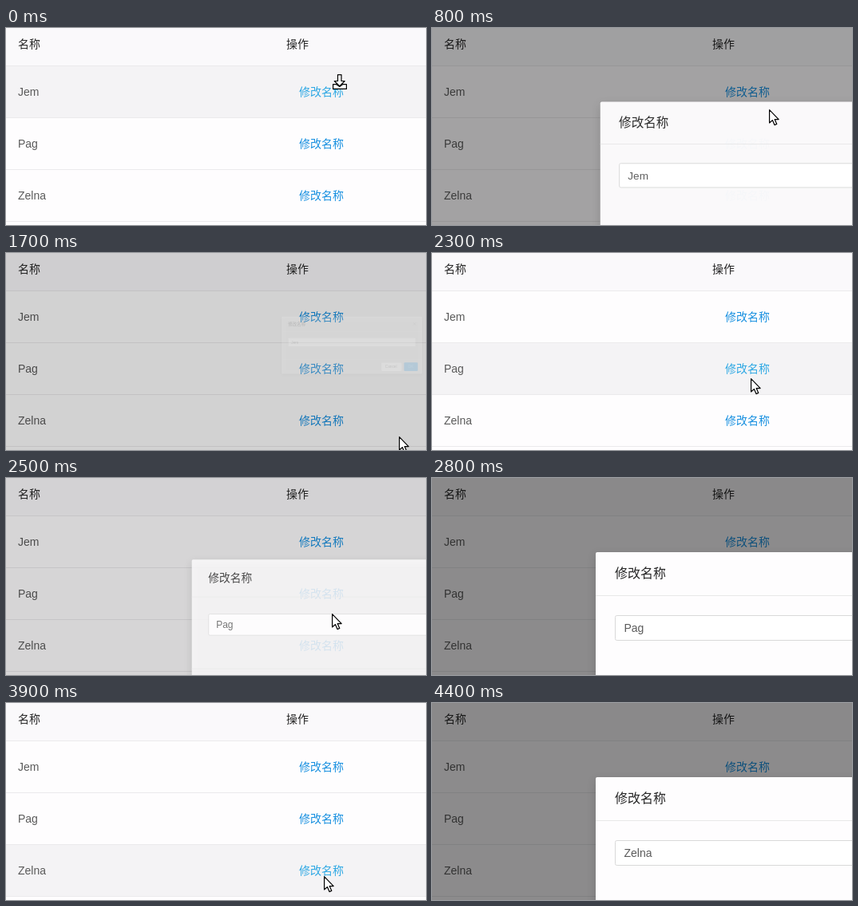
An HTML page with a canvas for the animation above (4800 ms loop, 526 by 247 pixels).

```html
<!DOCTYPE html>
<html lang="zh-CN">
<head>
<meta charset="utf-8">
<title>修改名称</title>
<style>
html, body { margin: 0; width: 100%; height: 100%; overflow: hidden; background: #fefdfe; }
canvas { display: block; width: 526px; height: 247px; }
</style>
</head>
<body>
<canvas id="stage"></canvas>
<script>
const W = 526, H = 247, LOOP = 4800, STEP = 100;
const FONT = '"Liberation Sans", "Noto Sans CJK SC", "Noto Sans CJK", sans-serif';
const BLUE = '#1890e0', HOVER_BLUE = '#2ea8e4';
const ROWS = ['Jem', 'Pag', 'Zelna'];
const ROW_TOP = 48, ROW_H = 65;

// x, y: zoom origin; lag: part of the closing already done at its first step
const DIALOGS = [
  { name: ROWS[0], x: 417, y: 73, open: 639, close: 1700, lag: 123 },
  { name: ROWS[1], x: 400, y: 159, open: 2430, close: 3300, lag: 10, cancelHover: true },
  { name: ROWS[2], x: 400, y: 217, open: 4030, close: Infinity, lag: 0 }
];

// time, x, y of the pointer tip; points outside the stage hide it
const POINTER = [
  [0, 416, 69], [400, 416, 69], [500, 417, 73], [600, 417, 73], [700, 418, 80],
  [800, 422, 102], [900, 452, 164], [1000, 498, 238], [1100, 560, 290], [1600, 670, 278],
  [1700, 492, 230], [1900, 432, 190], [2100, 405, 166], [2300, 399, 157], [2400, 400, 159],
  [2500, 408, 170], [2600, 436, 198], [2700, 482, 234], [2800, 560, 290], [3300, 560, 290],
  [3400, 308, 211], [3600, 352, 213], [3800, 396, 216], [4000, 400, 217], [4100, 406, 219],
  [4200, 432, 226], [4300, 478, 239], [4400, 560, 290], [4800, 560, 290]
];

const canvas = document.getElementById('stage');
const ctx = canvas.getContext('2d');
const ratio = window.devicePixelRatio || 1;
canvas.width = W * ratio;
canvas.height = H * ratio;

const clamp = v => Math.max(0, Math.min(1, v));

function bezier(x1, y1, x2, y2) {
  const at = (a, b, u) => 3 * a * u * (1 - u) ** 2 + 3 * b * u * u * (1 - u) + u ** 3;
  return x => {
    if (x <= 0 || x >= 1) return clamp(x);
    let lo = 0, hi = 1;
    for (let i = 0; i < 24; i++) {
      const mid = (lo + hi) / 2;
      if (at(x1, x2, mid) < x) lo = mid; else hi = mid;
    }
    return at(y1, y2, lo);
  };
}
const easeOut = bezier(0.08, 0.82, 0.17, 1);
const easeInOut = bezier(0.78, 0.14, 0.15, 0.86);

function pointerAt(t) {
  const i = POINTER.findIndex(p => p[0] > t);
  const [t0, x0, y0] = POINTER[i - 1], [t1, x1, y1] = POINTER[i];
  const k = (t - t0) / (t1 - t0);
  return { x: x0 + (x1 - x0) * k, y: y0 + (y1 - y0) * k };
}

// mask: backdrop strength, zoom: dialog progress
function dialogState(d, t) {
  if (t < d.open) return { mask: 0, zoom: 0 };
  if (t < d.close) {
    return { mask: clamp((t - d.open) / 200), zoom: easeOut((t - d.open) / 300) };
  }
  const k = clamp((t - d.close + d.lag) / 200);
  return { mask: 1 - k, zoom: 1 - easeInOut(k) };
}

function rect(x, y, w, h, color) {
  ctx.fillStyle = color;
  ctx.fillRect(x, y, w, h);
}

function text(s, x, y, color, size = 14) {
  ctx.font = `${size}px ${FONT}`;
  ctx.fillStyle = color;
  ctx.fillText(s, x, y);
}

function box(x, y, w, h, r, fill, stroke) {
  ctx.beginPath();
  ctx.roundRect(x, y, w, h, r);
  ctx.fillStyle = fill;
  ctx.fill();
  if (stroke) {
    ctx.strokeStyle = stroke;
    ctx.lineWidth = 1;
    ctx.stroke();
  }
}

function polygon(points) {
  ctx.beginPath();
  points.forEach(([x, y]) => ctx.lineTo(x, y));
  ctx.closePath();
  ctx.fillStyle = '#fff';
  ctx.fill();
  ctx.strokeStyle = '#000';
  ctx.lineWidth = 1.2;
  ctx.stroke();
}

function drawTable(p, active) {
  rect(0, 0, W, H, '#fefdfe');
  rect(0, 0, W, 47, '#faf9fb');
  rect(0, 47, W, 1, '#ebeaec');
  text('名称', 15, 25, '#262626');
  text('操作', 351, 25, '#262626');
  ROWS.forEach((name, i) => {
    const top = ROW_TOP + i * ROW_H;
    const hover = active && p.x < W && p.y >= top && p.y < top + ROW_H;
    const onLink = hover && p.x > 351 && p.x < 439 && Math.abs(p.y - top - 32) < 16;
    if (hover) rect(0, top, W, ROW_H - 1, '#f4f3f5');
    rect(0, top + ROW_H - 1, W, 1, '#ebeaec');
    text(name, 15, top + 37, '#5a5a5a');
    text('修改名称', 367, top + 37, onLink ? HOVER_BLUE : BLUE);
  });
}

function drawDialog(d, zoom) {
  const s = 0.2 + 0.8 * zoom;
  ctx.save();
  ctx.globalAlpha = zoom;
  ctx.translate(d.x, d.y);
  ctx.scale(s, s);
  ctx.translate(-d.x, -d.y);

  ctx.shadowColor = 'rgba(0,0,0,0.15)';
  ctx.shadowBlur = 12 * s * ratio;
  ctx.shadowOffsetY = 4 * s * ratio;
  box(205, 93, 520, 212, 4 * 0.5, '#fefdfe');
  ctx.shadowColor = 'transparent';

  rect(205, 147, 520, 1, '#e8e8e8');
  text('修改名称', 229, 125, '#262626', 16);
  ctx.beginPath();
  ctx.moveTo(692, 115); ctx.lineTo(702, 125);
  ctx.moveTo(702, 115); ctx.lineTo(692, 125);
  ctx.strokeStyle = '#8c8c8c';
  ctx.lineWidth = 1.5;
  ctx.stroke();

  box(229.5, 172.5, 471, 31, 2, '#fff', '#d9d9d9');
  text(d.name, 240.5, 193, '#5a5a5a');

  rect(205, 252, 520, 1, '#e8e8e8');
  const line = d.cancelHover ? '#40a9e8' : '#d0d0d0';
  box(573.5, 263.5, 76, 31, 4, '#fff', line);
  text('Cancel', 588, 284, d.cancelHover ? '#40a9e8' : '#5a5a5a');
  box(658, 263, 51, 32, 4, BLUE);
  text('OK', 673, 284, '#fff');
  ctx.restore();
}

function drawPointer({ x, y }, pressed) {
  ctx.save();
  ctx.lineJoin = 'round';
  if (pressed) {
    polygon([[409.6, 70.6], [413.5, 70.6], [417.8, 73.4], [422, 70.6], [426.4, 70.6],
      [426.4, 76.4], [409.6, 76.4]]);
    polygon([[415.5, 58.6], [420, 58.6], [420, 66.5], [424.2, 66.5], [417.8, 73],
      [411.3, 66.5], [415.5, 66.5]]);
  } else {
    ctx.translate(Math.round(x) + 0.6, Math.round(y) + 0.6);
    polygon([[0, 0], [0, 16.4], [3.8, 13], [6.4, 19], [9.2, 17.8], [6.6, 12], [11.6, 12]]);
  }
  ctx.restore();
}

function draw(now) {
  const t = Math.floor((now % LOOP) / STEP) * STEP;
  const p = pointerAt(t);
  const states = DIALOGS.map(d => dialogState(d, t));
  const mask = Math.max(...states.map(s => s.mask));

  ctx.setTransform(ratio, 0, 0, ratio, 0, 0);
  drawTable(p, mask === 0);
  if (mask > 0) rect(0, 0, W, H, `rgba(0,0,0,${0.45 * mask})`);
  states.forEach((s, i) => { if (s.zoom > 0) drawDialog(DIALOGS[i], s.zoom); });
  drawPointer(p, t === 0);
}

const start = performance.now();
function tick() {
  draw(performance.now() - start);
  requestAnimationFrame(tick);
}
tick();
</script>
</body>
</html>
```
